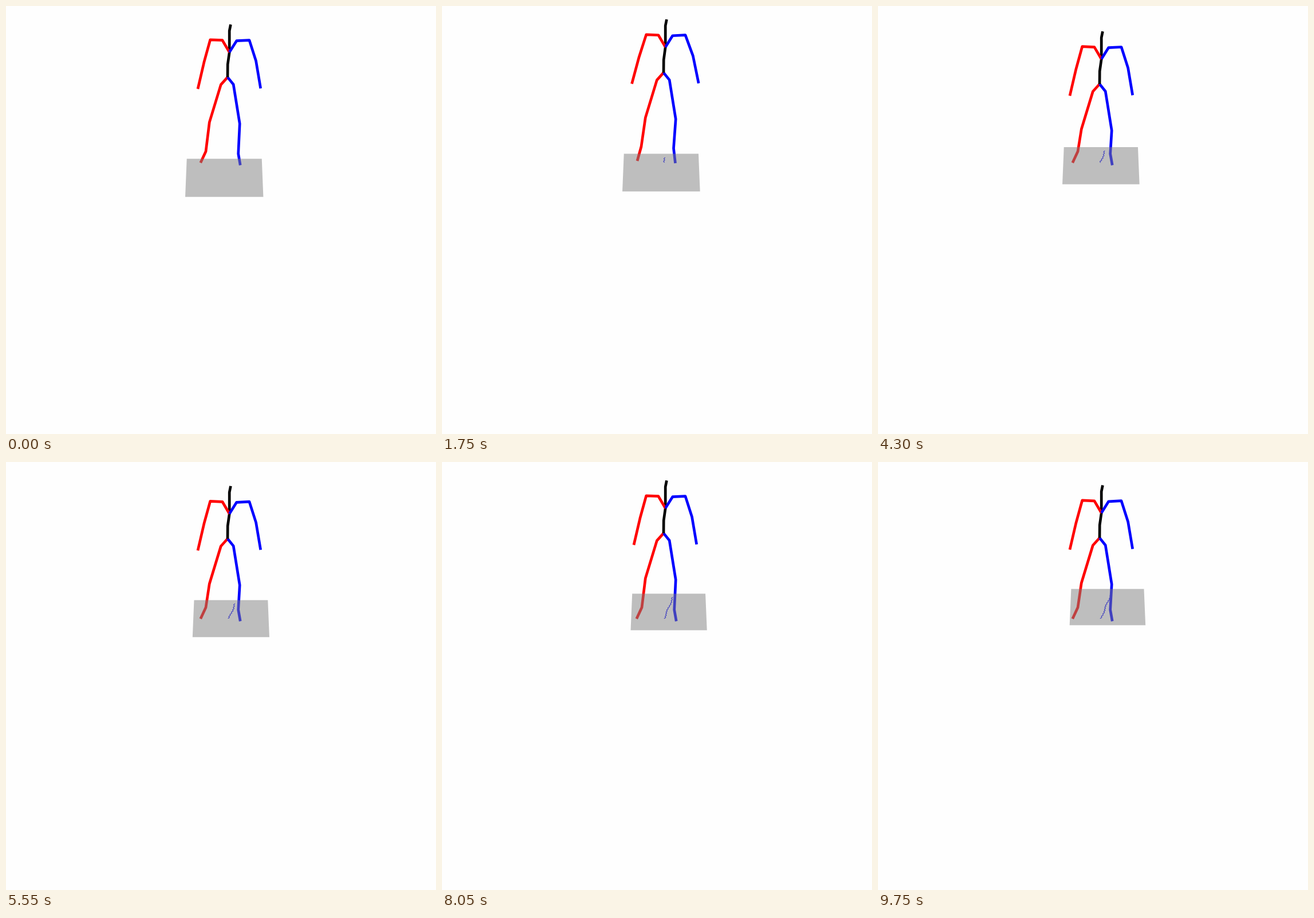
These frames come from a looping animation (751 px wide and 746 px high, 9.8 s). An HTML page with a canvas:

```html
<!DOCTYPE html>
<html lang="en">
<head>
<meta charset="utf-8">
<title>Jumping figure</title>
<style>
  html, body { margin: 0; width: 100%; height: 100%; overflow: hidden; background: #fefefe; }
  canvas { display: block; }
</style>
</head>
<body>
<canvas id="stage" width="751" height="746"></canvas>
<script>
const ctx = document.getElementById('stage').getContext('2d');
const LOOP = 9800, STEP = 50;
const AIR = .15; // half of the time spent off the ground

// time of the peak in seconds, height in pixels
const jumps = [[.6, 19], [1.6, 18], [3.27, 22], [4.62, 22], [5.81, 15], [7.45, 8], [9.13, 11], [10.15, 15]];

const smooth = x => {
  const u = Math.min(1, Math.max(0, x));
  return u * u * (3 - 2 * u);
};

// Crouch before and after each jump, rise on the toes, then fly on a parabola.
function body(t) {
  const gap = jump => Math.abs(t - jump[0]);
  const jump = jumps.reduce((a, b) => gap(b) < gap(a) ? b : a);
  const d = gap(jump);
  const crouch = Math.exp(-(((d - .32) / .13) ** 2));
  const tip = smooth((.26 - d) / (.26 - AIR));
  const lift = jump[1] * Math.max(0, 1 - (d / AIR) ** 2);
  return { hip: 124 + 12 * crouch - 10 * tip - lift, tip, lift };
}

// Steady backward drift with a slow and a quick sideways sway.
const drift = t => ({
  x: 381.3 + 1.84 * t + Math.sin(1.16 * (t - 3.4)) - .8 * Math.cos(7.4 * t),
  y: 5 * t + .8 * Math.sin(.6 * t)
});

function trace(points) {
  ctx.beginPath();
  points.forEach(([x, y]) => ctx.lineTo(x, y));
}

function line(color, points, width = 4.7) {
  ctx.strokeStyle = color;
  ctx.lineWidth = width;
  trace(points);
  ctx.stroke();
}

function drawTrail(time) {
  const now = drift(time), points = [];
  for (let t = 0; t <= time + .001; t += STEP / 1000) {
    const p = drift(t);
    points.push([388 + now.x - p.x, 273 - (now.y - p.y) * .95]);
  }
  line('#00f', points, 1.2);
}

function drawFigure(time) {
  const { hip, tip, lift } = body(time);
  const fromHip = (x, y) => [387 + x, hip + y];
  const fromChest = (x, y) => fromHip(3.2 + x, y - 43.5 - tip);
  const foot = (x, y, dx, dy) => [x + dx * tip, y + dy * tip - lift];
  const root = fromHip(0, 0), chest = fromChest(0, 0);
  const spread = 3.5 * tip;

  line('#f00', [root, fromHip(-11.7, 13), fromHip(-31.7, 78.5),
    foot(349, 253.5, -1, -8.5), foot(339.8, 273.3, 1.2, -3.3)]);
  line('#00f', [root, fromHip(10.2, 12.7), fromHip(21.2, 81),
    foot(405.7, 257.5, -1.2, -9.5), foot(409.2, 277.5, -1.7, -3.5)]);
  line('#000', [root, fromHip(.2, -22.4), chest, fromChest(0, -37.3), fromChest(2.2, -48.3)]);
  line('#f00', [chest, fromChest(-12.3, -20.9), fromChest(-33.5, -21.8),
    fromChest(-44.3 - spread / 2, 17.3), fromChest(-55.2 - spread, 64)]);
  line('#00f', [chest, fromChest(12.5, -19.9), fromChest(34.8, -21),
    fromChest(46.4 + spread / 2, 15.2), fromChest(54.5 + spread, 63)]);
}

function drawGround(time) {
  const { x, y } = drift(time);
  const top = 266.3 - y * .93, bottom = 332.8 - y;
  const far = 65.5 - y * .04, near = far + 2.7;
  ctx.fillStyle = 'rgba(128, 128, 128, .5)';
  trace([[x - far, top], [x + far, top], [x + near, bottom], [x - near, bottom]]);
  ctx.fill();
}

function render(now) {
  const time = Math.floor((now % LOOP) / STEP) * STEP / 1000;
  ctx.fillStyle = '#fefefe';
  ctx.fillRect(0, 0, 751, 746);
  ctx.lineJoin = 'round';
  drawTrail(time);
  drawFigure(time);
  drawGround(time);
}

const start = performance.now();
function tick() {
  render(performance.now() - start);
  requestAnimationFrame(tick);
}
tick();
</script>
</body>
</html>
```
